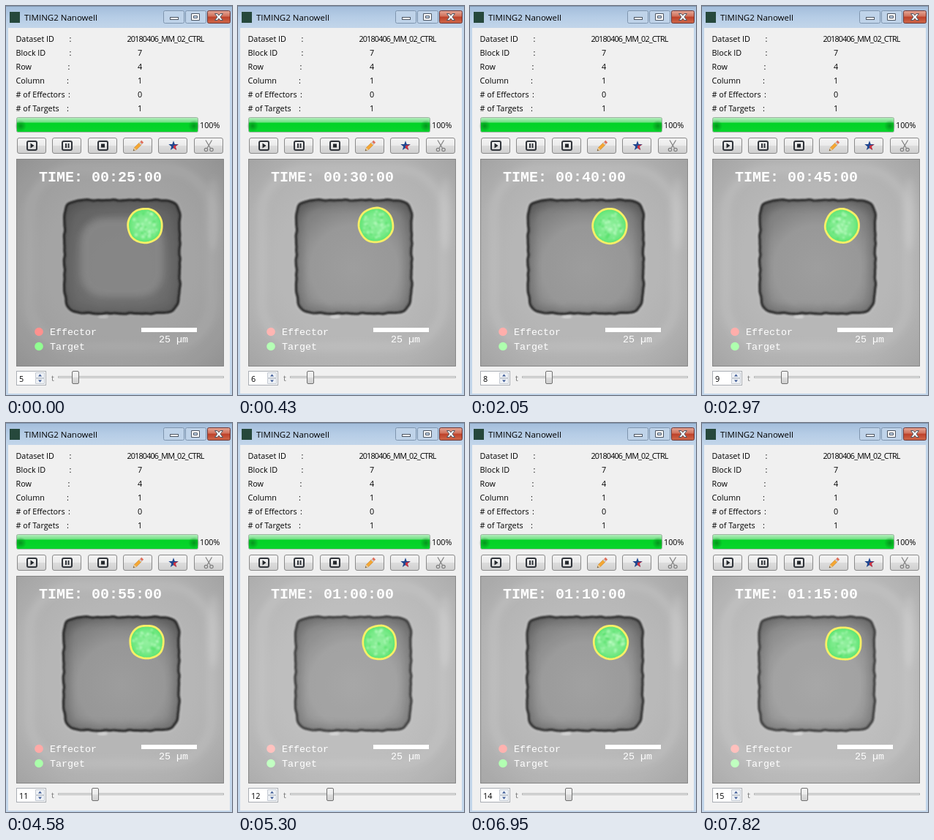
Recreate the animation shown at these times as an HTML page. Size 309 by 532 pixels, loop 8 s.

```html
<!DOCTYPE html>
<html lang="en">
<head>
<meta charset="utf-8">
<title>TIMING2 Nanowell</title>
<style>
  html, body { margin: 0; width: 100%; height: 100%; overflow: hidden; background: #f0f0f0; }
  svg { display: block; }
  text { font: 10.8px "Open Sans", "Noto Sans", sans-serif; fill: #000; white-space: pre; }
  .title { font-size: 11.5px; }
  .mid { text-anchor: middle; }
  .dataset { letter-spacing: -.82px; }
  .mono { font: 13.33px "Liberation Mono", monospace; fill: #fff; }
  .clock { font-size: 20px; font-weight: bold; }
</style>
</head>
<body>
<svg width="309" height="532">
  <defs>
    <linearGradient id="glass" x2="0" y2="1">
      <stop stop-color="#a3bddb"/><stop offset=".5" stop-color="#b6cde6"/><stop offset="1" stop-color="#c3d6ea"/>
    </linearGradient>
    <linearGradient id="close" x2="0" y2="1">
      <stop stop-color="#e5a797"/><stop offset=".45" stop-color="#d0705a"/>
      <stop offset=".5" stop-color="#bd4029"/><stop offset="1" stop-color="#cf694b"/>
    </linearGradient>
    <linearGradient id="button" x2="0" y2="1">
      <stop stop-color="#f4f4f4"/><stop offset=".48" stop-color="#ebebeb"/>
      <stop offset=".5" stop-color="#dddddd"/><stop offset="1" stop-color="#cfcfcf"/>
    </linearGradient>
    <linearGradient id="gloss" x2="0" y2="1">
      <stop stop-color="#b9efc2"/><stop offset=".3" stop-color="#74e186"/>
      <stop offset=".4" stop-color="#03d226"/><stop offset="1" stop-color="#08d52c"/>
    </linearGradient>
    <radialGradient id="ends">
      <stop stop-color="#056c16" stop-opacity=".6"/><stop offset="1" stop-color="#056c16" stop-opacity="0"/>
    </radialGradient>
    <radialGradient id="ground" r=".72">
      <stop offset=".5" stop-color="#b6b6b6"/><stop offset=".75" stop-color="#b0b0b0"/><stop offset="1" stop-color="#a2a2a2"/>
    </radialGradient>
    <radialGradient id="floor" cy=".6" r=".75">
      <stop stop-color="#9d9d9d"/><stop offset=".5" stop-color="#979797"/>
      <stop offset=".8" stop-color="#7d7d7d"/><stop offset="1" stop-color="#5c5c5c"/>
    </radialGradient>
    <radialGradient id="green">
      <stop stop-color="#94f0a0"/><stop offset=".7" stop-color="#78ea88"/><stop offset="1" stop-color="#5ce471"/>
    </radialGradient>
    <filter id="soft" x="-30%" y="-30%" width="160%" height="160%"><feGaussianBlur stdDeviation="5"/></filter>
    <filter id="hazy"><feGaussianBlur stdDeviation="1.3"/></filter>
    <filter id="fuzz"><feGaussianBlur stdDeviation=".8"/></filter>
    <clipPath id="view"><rect x="15" y="210" width="282" height="282"/></clipPath>
    <clipPath id="inside"><path class="well"/></clipPath>
  </defs>

  <rect width="309" height="532" fill="#c3d6ea"/>
  <rect width="309" height="31" fill="url(#glass)"/>
  <path d="M0 .5H309" stroke="#7f95ae"/>
  <rect x="3" y="30" width="303" height="500" fill="#f0f0f0"/>
  <rect x="5" y="8" width="14" height="15" fill="#26483c"/>
  <text class="title" x="25" y="20">TIMING2 Nanowell</text>
  <g fill="#bfd3e9" stroke="#7f95ae">
    <rect x="215.5" y="6.5" width="28" height="17" rx="2"/>
    <rect x="245.5" y="6.5" width="28" height="17" rx="2"/>
    <rect x="275.5" y="6.5" width="31" height="17" rx="2" fill="url(#close)" stroke="#6b3535"/>
  </g>
  <g fill="#fff" stroke="#4d5663">
    <rect x="224.5" y="15.5" width="11" height="3"/>
    <path d="M253.500 10.500h11v9h-11zm3 3v3h5v-3z" fill-rule="evenodd"/>
    <path d="M285.500 10.500h3.500l2 2.500 2-2.500h3.500l-3.500 4.500 3.500 4.500h-3.500l-2-2.500-2 2.500h-3.500l3.500-4.500z"/>
  </g>

  <g id="facts"></g>
  <rect x="14.5" y="152.500" width="248" height="20" rx="2" fill="url(#gloss)" stroke="#9fb3a2"/>
  <ellipse cx="20" cy="164" rx="8" ry="8" fill="url(#ends)"/>
  <ellipse cx="257" cy="164" rx="8" ry="8" fill="url(#ends)"/>
  <text x="265" y="167">100%</text>

  <g id="buttons" fill="url(#button)" stroke="#8a8a8a"></g>
  <g fill="none" stroke="#30343a" stroke-width="2">
    <rect x="29" y="185" width="13" height="12" rx="2"/>
    <rect x="77" y="185" width="13" height="12" rx="2"/>
    <rect x="126" y="185" width="13" height="12" rx="2"/>
    <path d="M82 188v6M85.500 188v6"/>
  </g>
  <path d="M33.500 187.500l5 3.500-5 3.500zM130 188.500h5v5h-5z" fill="#22262b"/>
  <g transform="translate(174 198) rotate(-45)">
    <path d="M0 0L4-2H14V2H4z" fill="#f5a733" stroke="#b8741e" stroke-width=".5"/>
    <path d="M0 0L4-2V2z" fill="#e9cfa0"/><path d="M0 0l1.800-.9v1.800z" fill="#333"/>
    <path d="M13-2h2v4h-2z" fill="#ccc"/><path d="M15-2h3v4h-3z" fill="#e0705c"/>
  </g>
  <g transform="translate(229 191) scale(.9) translate(-228.500 -191)">
    <path d="M228.500 183.500l1.900 5.200 5.600.2-4.400 3.400 1.500 5.400-4.600-3.100-4.600 3.100 1.500-5.400-4.400-3.400 5.600-.2z" fill="#20478f"/>
    <path d="M228.500 191l7.500-2-4.400 3.400 1.500 5.400-4.600-3.100z" fill="#cf3340"/>
  </g>
  <g fill="none" stroke="#808080" stroke-width="1.200">
    <path d="M273 183.500l6.500 11M281.500 183.500l-6.500 11"/>
    <circle cx="273.500" cy="196.500" r="2.200"/><circle cx="281" cy="196.500" r="2.200"/>
  </g>

  <rect x="14.500" y="209.500" width="283" height="283" fill="url(#ground)" stroke="#858585"/>
  <g clip-path="url(#view)">
    <g fill="none" filter="url(#soft)">
      <rect x="32" y="223" width="249" height="243" rx="62" stroke="#fff" stroke-width="12" opacity=".1"/>
      <ellipse cx="284" cy="285" rx="8" ry="50" fill="#fff" opacity=".16"/>
    </g>
    <g id="nanowell">
      <path class="well" fill="none" stroke="#d0d0d0" stroke-width="9" opacity=".3" filter="url(#hazy)"/>
      <path class="well" fill="url(#floor)"/>
      <g clip-path="url(#inside)">
        <path class="well" fill="none" stroke="#444" stroke-width="18" opacity=".25" filter="url(#soft)"/>
        <g id="dim">
          <path class="well" fill="#606060" opacity=".5"/>
          <rect x="102" y="290" width="113" height="108" rx="32" fill="#9c9c9c" opacity=".8" filter="url(#soft)"/>
        </g>
      </g>
      <path class="well" fill="none" stroke="#2c2c2c" stroke-width="3.400" filter="url(#fuzz)"/>
      <ellipse cx="133" cy="425" rx="7" ry="2.500" fill="#e8e8e8" opacity=".5" filter="url(#hazy)"/>
    </g>
    <rect id="exposure" x="15" y="210" width="282" height="282"/>
    <path id="membrane" fill="url(#green)" stroke="#f8ef66" stroke-width="2.800"/>
    <g id="specks" filter="url(#fuzz)"></g>
    <text class="mono clock" id="clock" x="45" y="240"></text>
    <circle id="effector" cx="45" cy="445.500" r="5.800"/>
    <circle id="target" cx="45" cy="465.500" r="5.800"/>
    <text class="mono" x="60" y="450">Effector</text>
    <text class="mono" x="60" y="470">Target</text>
    <rect x="185" y="440" width="76" height="6" fill="#fff"/>
    <text class="mono" x="209" y="460">25 µm</text>
  </g>

  <rect x="14.500" y="499.500" width="40" height="19" fill="#fff" stroke="#a9adb3"/>
  <path d="M40.500 501.500h12v7h-12zM40.500 509.500h12v7h-12z" fill="#eef1f5" stroke="#c5cbd3"/>
  <path d="M44 506.500l2.500-3 2.500 3zM44 511.500l2.500 3 2.500-3z" fill="#3c5a96"/>
  <text id="step" x="18" y="514"></text>
  <text x="62" y="513" style="fill:#777">t</text>
  <rect x="71.500" y="506.500" width="226" height="2" fill="#e7eaea" stroke="#b9b9b9"/>
  <rect id="thumb" y="499.500" width="9" height="17" rx="1.500" fill="url(#button)" stroke="#707070"/>
</svg>
<script>
const $ = id => document.getElementById(id);
const LOOP = 8000, FIRST_STEP = 5;
const starts = [0, 430, 1300, 2050, 2970, 3840, 4580, 5300, 6140, 6950, 7820];
// Cell pose per step: centre x, centre y, radius x, radius y
const poses = [
  [190, 300.5, 23.5, 23.5], [188.500, 299.500, 23.5, 23.5], [190, 300, 23.5, 23.5], [191, 301, 23, 23.5],
  [191.500, 300.500, 23, 23], [192, 300, 23, 23], [192.500, 299.500, 23, 22.500], [193.300, 300, 22.500, 23],
  [191, 299.500, 23, 23], [192.500, 300, 23, 22.500], [193.500, 301.500, 23.5, 21.500]
];
// Brightness per step: negative darkens the micrograph, positive lightens it
const exposures = [-.1, .01, .01, 0, .01, 0, 0, .1, 0, .04, .1];
const tints = [145, 181, 176, 174, 174, 172, 170, 194, 172, 178, 192];

function randomizer(seed) {
  return () => (seed = (seed * 16807) % 2147483647) / 2147483647;
}

// Closed superellipse outline; power and edge offset depend on the angle
function outline([cx, cy, rx, ry], power, wobble, count) {
  const points = Array.from({ length: count }, (_, i) => {
    const a = i / count * 2 * Math.PI, c = Math.cos(a), s = Math.sin(a), p = power(a);
    const r = (Math.abs(c) ** p + Math.abs(s) ** p) ** (-1 / p), w = wobble(a);
    return `${(cx + c * r * (rx + w)).toFixed(2)} ${(cy + s * r * (ry + w)).toFixed(2)}`;
  });
  return `M${points.join('L')}Z`;
}

const wellPath = outline([158.700, 343, 78.800, 77.500],
  a => a < Math.PI ? 7.5 : 10,
  a => .4 * Math.sin(17 * a) + .3 * Math.sin(29 * a + 1) + .2 * Math.sin(47 * a), 300);
document.querySelectorAll('.well').forEach(p => p.setAttribute('d', wellPath));

const facts = [
  ['Dataset ID', 86.500, '20180406_MM_02_CTRL'], ['Block ID', 86.500, 7], ['Row', 84.500, 4],
  ['Column', 83, 1], ['# of Effectors', 85, 0], ['# of Targets', 83, 1]
];
$('facts').innerHTML = facts.map(([label, colon, value], i) => {
  const y = 49 + i * 19;
  return `<text x="13.500" y="${y}">${label}</text><text x="${colon}" y="${y}">:</text>` +
    `<text class="mid ${i ? '' : 'dataset'}" x="${i ? 183 : 218}" y="${y}">${value}</text>`;
}).join('');

$('buttons').innerHTML = [15, 63, 112, 160, 208, 257].map(x =>
  `<rect x="${x + .5}" y="180.500" width="39" height="21" rx="2.500"/>`).join('');

function specks(step, [cx, cy, rx, ry]) {
  const random = randomizer(step * 7919 + 31);
  return Array.from({ length: 44 }, (_, i) => {
    const a = random() * 2 * Math.PI, d = Math.sqrt(random()) * .8;
    const x = cx + Math.cos(a) * d * rx, y = cy + Math.sin(a) * d * ry;
    const color = i % 3 ? '#c8ffce' : '#4cdc62';
    return `<circle cx="${x.toFixed(1)}" cy="${y.toFixed(1)}" r="${(1 + random() * 1.5).toFixed(1)}" fill="${color}" opacity=".55"/>`;
  }).join('');
}

function show(index) {
  const step = FIRST_STEP + index, pose = poses[index], tint = tints[index], exposure = exposures[index];
  const minutes = step * 5, pad = n => String(n).padStart(2, '0');
  $('clock').textContent = `TIME: ${pad(Math.floor(minutes / 60))}:${pad(minutes % 60)}:00`;
  $('step').textContent = step;
  $('thumb').setAttribute('x', Math.floor(90 + index * 4.5) + .5);
  $('nanowell').setAttribute('transform', `translate(${-.18 * index})`);
  $('exposure').setAttribute('fill', exposure < 0 ? '#000' : '#fff');
  $('exposure').setAttribute('opacity', Math.abs(exposure));
  $('dim').setAttribute('visibility', index ? 'hidden' : 'visible');
  $('effector').setAttribute('fill', `rgb(255,${tint},${tint - 3})`);
  $('target').setAttribute('fill', `rgb(${tint},255,${tint})`);
  $('membrane').setAttribute('d', outline(pose, () => 2 + .2 * Math.abs(pose[2] - pose[3]),
    a => .25 * Math.sin(4 * a + step) + .12 * Math.sin(7 * a + step * 2), 90));
  $('specks').innerHTML = specks(step, pose);
}

let shown = -1;
function tick() {
  const time = performance.now() % LOOP;
  const index = starts.findLastIndex(start => start <= time);
  if (index !== shown) show(shown = index);
  requestAnimationFrame(tick);
}
tick();
</script>
</body>
</html>
```
